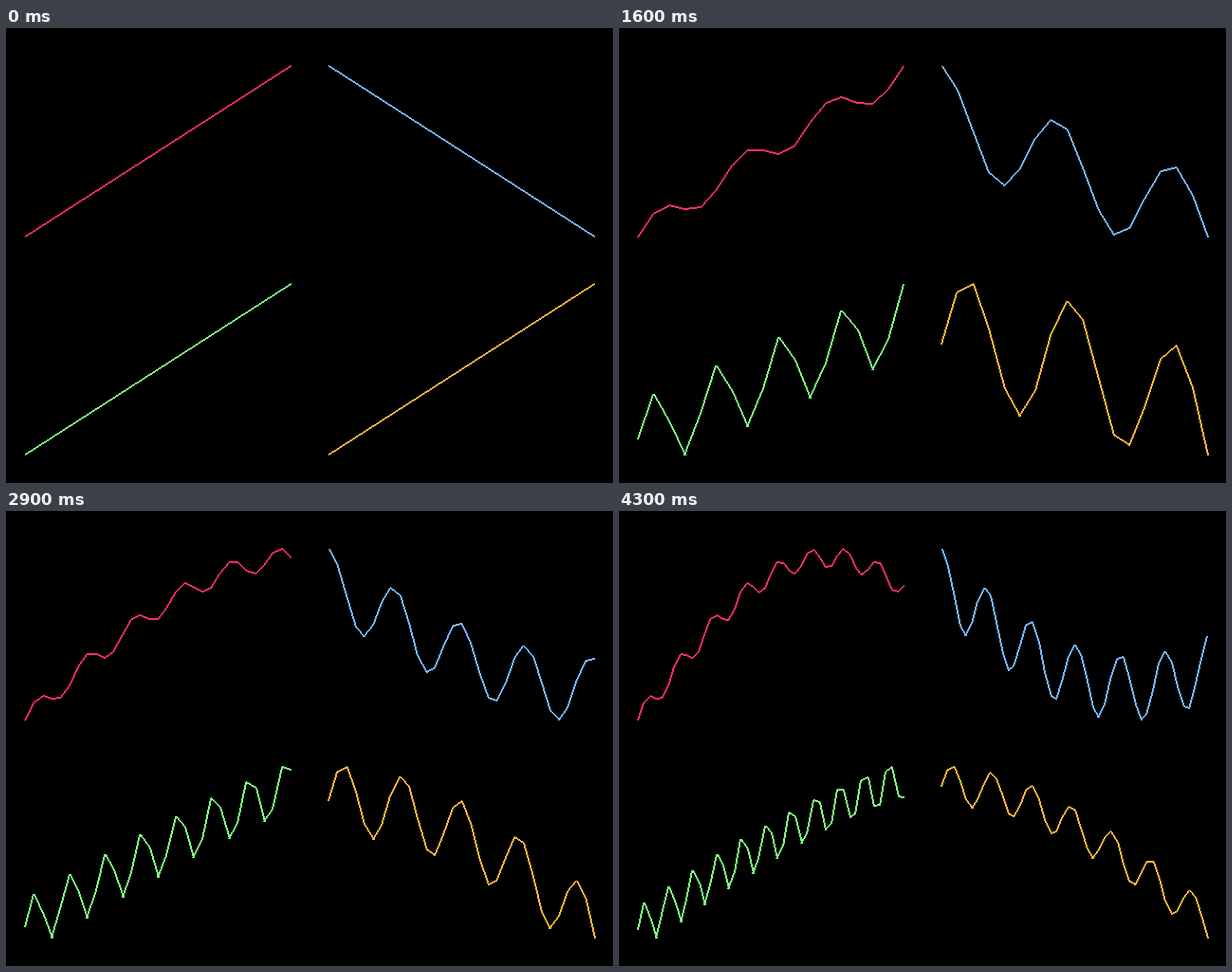
Write an HTML page with a canvas that moves like this. It is 640 by 480 pixels and loops after 4400 ms.

```html
<!DOCTYPE html>
<html lang="en">
<head>
<meta charset="utf-8">
<title>Growing signals</title>
<style>
  html, body { margin: 0; width: 100%; height: 100%; overflow: hidden; background: #000; }
  canvas { display: block; }
</style>
</head>
<body>
<canvas id="stage" width="640" height="480"></canvas>
<script>
const ctx = document.getElementById('stage').getContext('2d');
const STEP_MS = 100;
const STEPS = 44;
const PLOT_W = 280;
const PLOT_H = 180;
const { sin, cos, abs, round } = Math;

// Each signal is a slow wave plus a fast ripple.
const plots = [
  { x: 20, y: 40, color: '#ff2b70', f: t => sin(t) + 0.0625 * sin(23 * t) },
  { x: 340, y: 40, color: '#78b4ff', f: t => 0.31 * cos(17 * t) - sin(t) },
  { x: 20, y: 270, color: '#80ff80', f: t => sin(t / 2) + 0.132 * sin(31 * t) },
  { x: 340, y: 270, color: '#ffb43c', f: t => cos(0.8 * t) + 0.17 * sin(19 * t) }
];

// Crisp line, two pixels thick towards the left of its direction.
function drawLine([x0, y0], [x1, y1]) {
  const dx = x1 - x0;
  const dy = y1 - y0;
  const steep = abs(dy) > abs(dx);
  const count = Math.max(abs(dx), abs(dy));
  for (let i = 0; i <= count; i++) {
    const x = round(x0 + dx * i / count);
    const y = round(y0 + dy * i / count);
    if (steep) ctx.fillRect(dy > 0 ? x : x - 1, y, 2, 1);
    else ctx.fillRect(x, y - 1, 1, 2);
  }
}

// Fits the samples so far to the full plot area, on whole pixels.
function drawPlot({ x, y, color, f }, segments) {
  const values = Array.from({ length: segments + 1 }, (_, i) => f(i * 0.05));
  const low = Math.min(...values);
  const high = Math.max(...values);
  const points = values.map((v, i) => [
    round(x + PLOT_W * i / segments),
    y + PLOT_H - Math.floor(PLOT_H * (v - low) / (high - low))
  ]);
  ctx.fillStyle = color;
  for (let i = 0; i < segments; i++) drawLine(points[i], points[i + 1]);
}

function draw(now) {
  const step = Math.floor(now / STEP_MS) % STEPS;
  ctx.fillStyle = '#000';
  ctx.fillRect(0, 0, 640, 480);
  plots.forEach(plot => drawPlot(plot, step + 1));
}

const start = performance.now();
function loop() {
  draw(performance.now() - start);
  requestAnimationFrame(loop);
}
loop();
</script>
</body>
</html>
```
